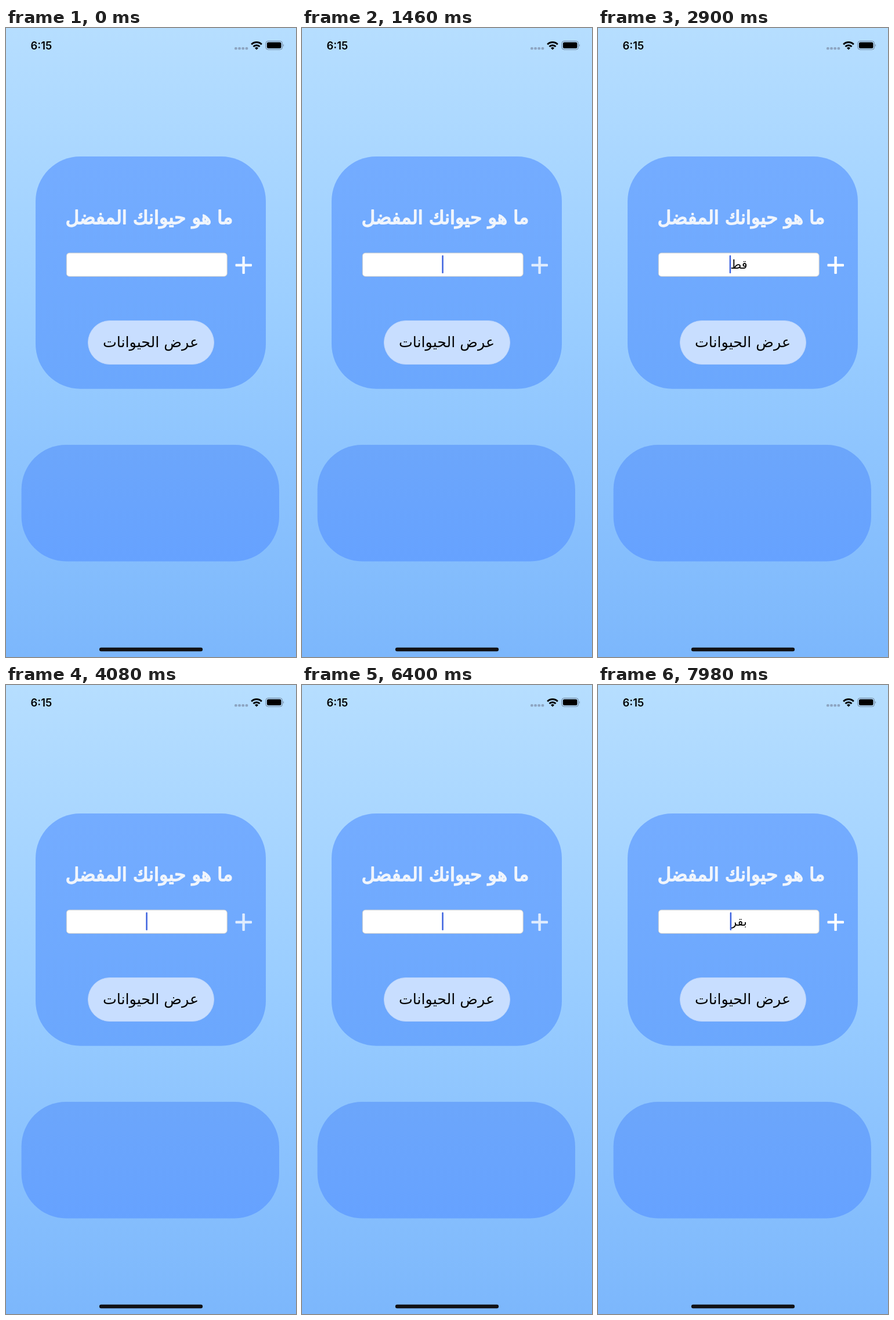
Write an HTML page that moves like this. It is 500 by 1082 pixels and loops after 8 s.

```html
<!DOCTYPE html>
<html lang="ar">
<head>
<meta charset="utf-8">
<title>ما هو حيوانك المفضل</title>
<style>
  html, body { margin: 0; width: 100%; height: 100%; overflow: hidden; background: #96caff; }
  svg { display: block; width: 100%; height: 100%; }
  text { font-family: "DejaVu Sans", sans-serif; text-anchor: middle; }
  .title { font-size: 32.2px; fill: #f0f5fc; stroke: #f0f5fc; stroke-width: 1.8px; stroke-linejoin: round; }
  .label { font-size: 25.3px; }
  .entry { font-size: 20.5px; }
  .clock { font: 600 18.4px Inter, sans-serif; text-anchor: start; }
</style>
</head>
<body>
<svg viewBox="0 0 500 1082" preserveAspectRatio="none">
  <defs>
    <linearGradient id="sky" x2="0" y2="1">
      <stop stop-color="#b6deff"/>
      <stop offset=".5" stop-color="#98ccff"/>
      <stop offset="1" stop-color="#7cb7fc"/>
    </linearGradient>
    <linearGradient id="card" x2="0" y2="1">
      <stop stop-color="#74acff"/>
      <stop offset="1" stop-color="#6ba7fd"/>
    </linearGradient>
    <linearGradient id="panel" x2="0" y2="1">
      <stop stop-color="#6ca6fb"/>
      <stop offset="1" stop-color="#66a2ff"/>
    </linearGradient>
  </defs>
  <rect width="500" height="1082" fill="url(#sky)"/>

  <!-- Status bar -->
  <text class="clock" x="42.5" y="37">6:15</text>
  <g fill="#8da5c2">
    <rect x="394" y="33" width="4.6" height="4.2" rx="1.5"/>
    <rect x="400.2" y="33" width="4.6" height="4.2" rx="1.5"/>
    <rect x="406.4" y="33" width="4.6" height="4.2" rx="1.5"/>
    <rect x="412.6" y="33" width="4.6" height="4.2" rx="1.5"/>
  </g>
  <g fill="none" stroke="#000" stroke-width="3">
    <path d="M423.2 28.2a12.5 12.5 0 0 1 17.6 0M426.5 32a7.8 7.8 0 0 1 11 0"/>
  </g>
  <path d="M432 37.5l-3-3a4.3 4.3 0 0 1 6 0z"/>
  <rect x="447.9" y="22.5" width="28.6" height="14.6" rx="4" fill="none" stroke="#6c8199"/>
  <rect x="449.9" y="24.5" width="24.6" height="10.6" rx="2.5"/>
  <path d="M478 27.5q2 2.3 0 4.8z" fill="#6c8199"/>

  <!-- Question card -->
  <rect x="51" y="221" width="397" height="399.7" rx="77" fill="url(#card)"/>
  <text class="title" x="247" y="337" direction="rtl">ما هو حيوانك المفضل</text>
  <rect x="104.3" y="387" width="276.9" height="40.3" rx="5" fill="#fff" stroke="#c8cacc"/>
  <text class="entry" id="entry" x="243" y="414" direction="rtl"></text>
  <rect id="caret" y="391" width="2.5" height="31" rx="1" fill="#3c62df"/>
  <g id="plus" fill="#fff">
    <rect x="395.5" y="405.8" width="28.5" height="4.4" rx="1.2"/>
    <rect x="407.4" y="393" width="4.4" height="30" rx="1.2"/>
  </g>
  <rect x="141.5" y="503.5" width="217" height="75" rx="37.5" fill="#c8deff" stroke="#b9d3fb"/>
  <text class="label" x="249.5" y="549" direction="rtl">عرض الحيوانات</text>

  <!-- Empty list panel and home indicator -->
  <rect x="26.6" y="717" width="444.4" height="200.4" rx="77" fill="url(#panel)"/>
  <rect x="160.9" y="1065.8" width="178.2" height="6.4" rx="3.2" fill="#111216"/>
</svg>
<script>
const LOOP = 8000;
const CENTER = 242.5;
const PRESSED = 0.78;

// [start ms, typed text, caret opacity, plus opacity]
const states = [
  [0, '', 0, 0.92],
  [100, 'أ', 1, 1],
  [270, 'أس', 1, 1],
  [440, 'أسد', 1, 1],
  [1200, 'أسد', 0.5, 1],
  [1330, 'أسد', 0, 1],
  [1460, '', 1, PRESSED],
  [1770, '', 1, 0.9],
  [1940, '', 1, 1],
  [2110, 'ق', 1, 1],
  [2550, 'ق', 0.6, 1],
  [2725, 'ق', 0.1, 1],
  [2900, 'قط', 1, 1],
  [3490, 'قط', 0.7, 1],
  [3640, 'قط', 0.3, 1],
  [3790, 'قط', 0, 1],
  [4080, '', 1, PRESSED],
  [4180, '', 1, 0.9],
  [4440, '', 1, 1],
  [4800, 'ك', 1, 1],
  [5090, 'كل', 1, 1],
  [5390, 'كلب', 1, 1],
  [5890, 'كلب', 0.7, 1],
  [6060, 'كلب', 0.3, 1],
  [6230, 'كلب', 0, 1],
  [6400, '', 1, PRESSED],
  [6680, '', 1, 0.9],
  [6860, '', 1, 1],
  [7040, 'ب', 1, 1],
  [7210, 'بق', 1, 1],
  [7670, 'بق', 0.6, 1],
  [7830, 'بق', 0.1, 1],
  [7980, 'بقر', 1, 1],
];

const entry = document.getElementById('entry');
const caret = document.getElementById('caret');
const plus = document.getElementById('plus');
const start = performance.now();

function render() {
  const time = Math.max(0, performance.now() - start) % LOOP;
  const [, text, caretOpacity, plusOpacity] = states.findLast(([from]) => from <= time);
  entry.textContent = text;
  const width = text ? entry.getComputedTextLength() : 0;
  caret.setAttribute('x', CENTER - width / 2 - 1.2);
  caret.setAttribute('opacity', caretOpacity);
  plus.setAttribute('opacity', plusOpacity);
  requestAnimationFrame(render);
}
render();
</script>
</body>
</html>
```
